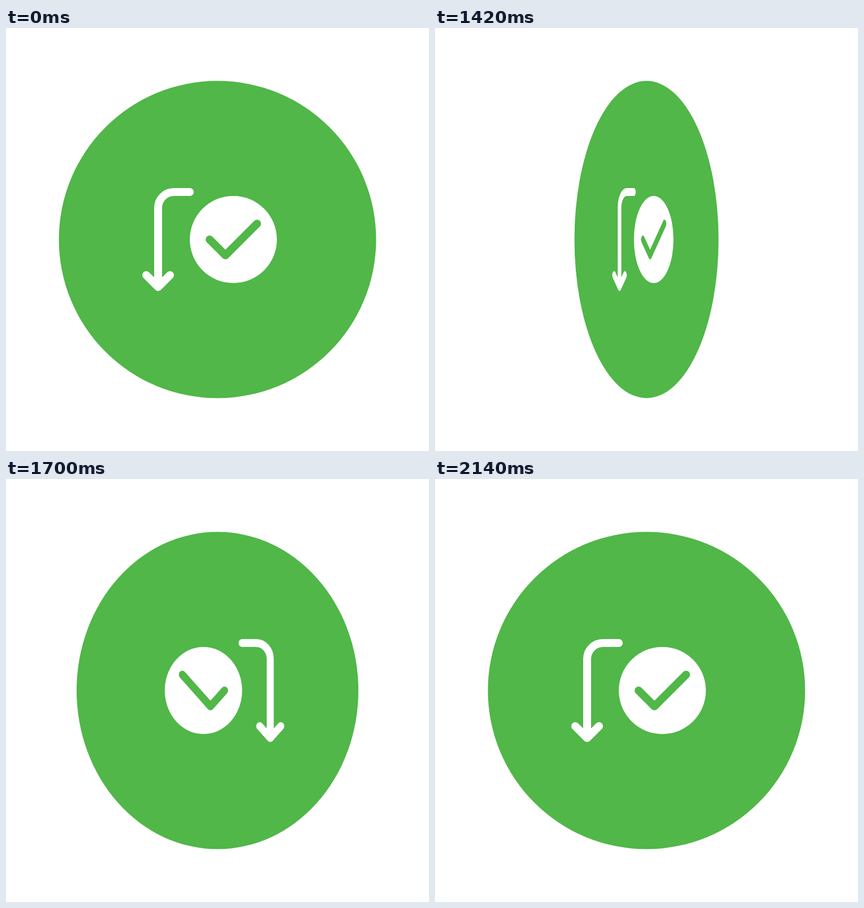
These frames come from a looping animation (748x748 px, 2980 ms). An HTML page:

```html
<!DOCTYPE html>
<html lang="en">
<head>
<meta charset="utf-8">
<title>Flipping badge</title>
<style>
  html, body { margin: 0; width: 100%; height: 100%; overflow: hidden; background: #fff; }
  svg { display: block; width: 100%; height: 100%; }
  path { fill: none; stroke-width: 14; stroke-linecap: round; stroke-linejoin: round; }
</style>
</head>
<body>
<svg viewBox="0 0 748 748">
  <g id="badge">
    <circle cx="374" cy="374" r="280.5" fill="#50b748"/>
    <path stroke="#fff" d="M325 290H297A28 28 0 0 0 269 318V458M248 437L269 458L290 437"/>
    <circle cx="402" cy="374" r="77" fill="#fff"/>
    <path stroke="#50b748" d="M360 374L388 402L444 346"/>
  </g>
</svg>
<script>
  const LOOP = 2980, STEP = 20, START = 1158, DURATION = 984, CENTER = 374;
  const badge = document.getElementById('badge');
  const smooth = u => u * u * (3 - 2 * u);

  // One full turn about the vertical axis, seen without perspective.
  function draw() {
    const time = Math.floor(performance.now() % LOOP / STEP) * STEP;
    const u = Math.min(1, Math.max(0, (time - START) / DURATION));
    const scale = Math.cos(2 * Math.PI * smooth(u));
    badge.setAttribute('transform', `matrix(${scale} 0 0 1 ${CENTER * (1 - scale)} 0)`);
    requestAnimationFrame(draw);
  }
  draw();
</script>
</body>
</html>
```
